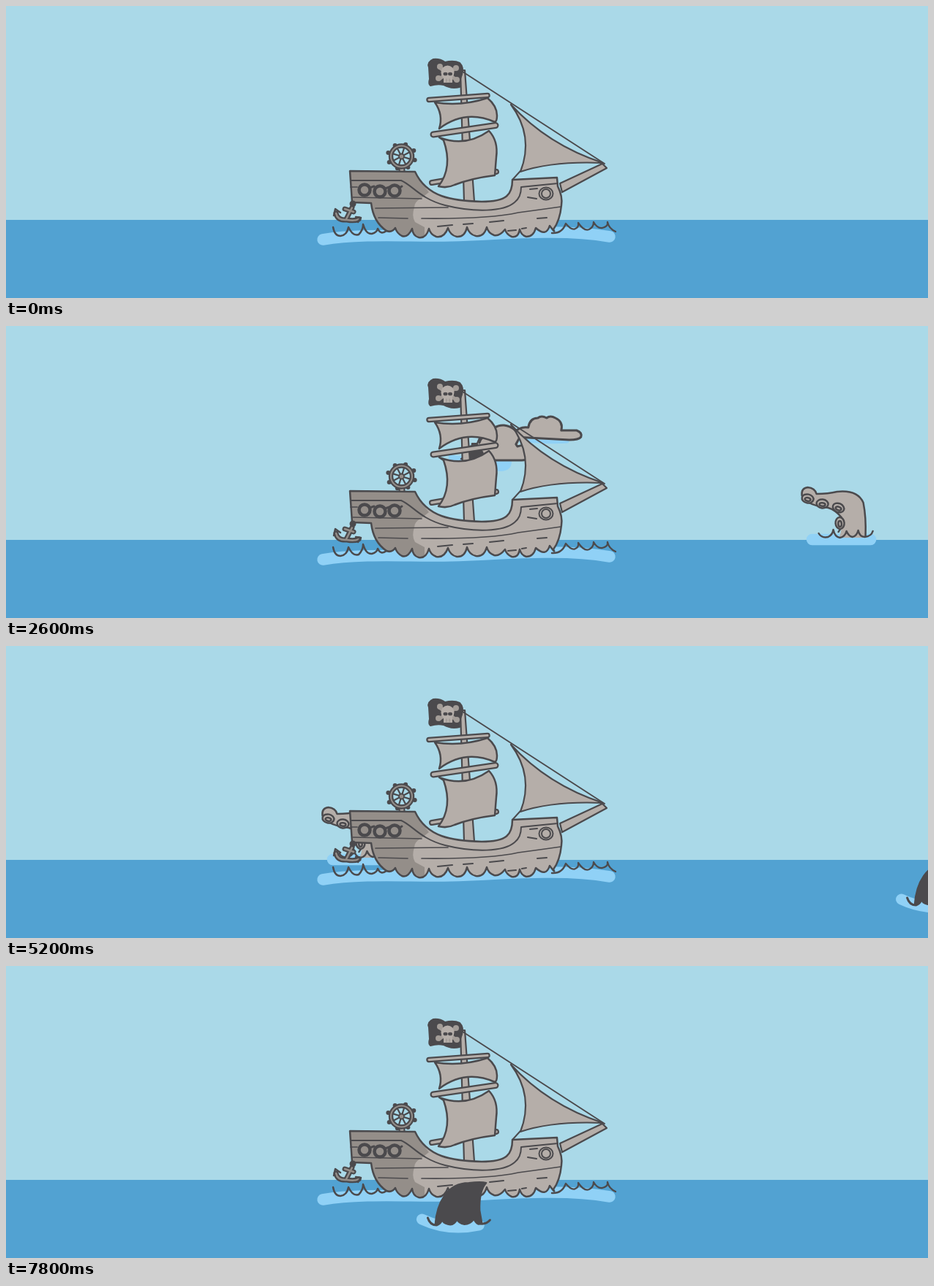
Recreate the animation shown at these times as an HTML page with a canvas. Size 1260 by 400 pixels, loop 8 s.

```html
<!DOCTYPE html>
<html lang="en">
<head>
<meta charset="utf-8">
<title>Ship at sea</title>
<style>
  html, body { margin: 0; width: 100%; height: 100%; overflow: hidden; background: #aad9e8; }
  canvas { display: block; width: 1260px; height: 400px; }
</style>
</head>
<body>
<canvas id="stage" width="1260" height="400"></canvas>
<script>
const ctx = document.getElementById('stage').getContext('2d');
const SKY = '#aad9e8', SEA = '#52a2d2', FOAM = '#90d1f6';
const INK = '#4b4a4d', GREY = '#b5aea9', SHADE = '#948e89', BONE = '#a39d98';
const LOOP = 8000, STEP = 200, CROSSING = 5000, WIDTH = 1260;

ctx.lineJoin = ctx.lineCap = 'round';

function fill(d, color) {
  ctx.fillStyle = color;
  ctx.fill(new Path2D(d));
}
function line(d, width = 2.5, color = INK) {
  ctx.lineWidth = width;
  ctx.strokeStyle = color;
  ctx.stroke(new Path2D(d));
}
function shape(d, color = GREY, width = 2.5) {
  fill(d, color);
  line(d, width);
}
function oval(x, y, rx, ry, color, width = 0, tilt = 0) {
  ctx.beginPath();
  ctx.ellipse(x, y, rx, ry, tilt, 0, Math.PI * 2);
  if (color) { ctx.fillStyle = color; ctx.fill(); }
  if (width) { ctx.lineWidth = width; ctx.strokeStyle = INK; ctx.stroke(); }
}
function spar(d, width) {
  line(d, width);
  line(d, width - 4.4, GREY);
}

function cloud() {
  fill('M0 176Q40 182 86 182Q88 198 72 199Q40 197 0 190Z', FOAM);
  line('M97 156Q135 160 162 158', 5, FOAM);
  shape('M89 146Q98 137 109 139Q111 126 122 126Q127 122 134 126Q139 122 146 126Q157 131 154 143L175 143Q183 146 181 152Q178 156 165 156L90 152Z', GREY, 3);
  shape('M17 182L24 177L21 173L28 171L25 166L32 164L32 161L39 161L42 154L54 160L55 184L34 183L30 186L26 182Z', INK, 2);
  fill('M42 184Q54 177 43 167Q36 160 46 155Q50 147 58 149Q61 135 76 136Q95 139 97 156Q95 160 94 165Q110 160 113 172Q112 184 100 184Z', GREY);
  line('M42 160Q45 149 58 149Q61 135 76 136Q92 138 97 153L92 162L94 165Q110 160 113 172Q112 184 100 184L42 184', 3);
}

function tentacle() {
  line('M18 292.5H98', 15.5, FOAM);
  fill('M4 232Q3 222 12 221Q22 222 24 230Q40 230 52 227Q80 224 88 242Q92 262 91 290L55 290Q60 277 58 262Q50 252 40 249Q22 247 14 242Q6 240 4 232Z', GREY);
  line('M54 282Q60 275 58 262Q50 252 40 249Q22 247 14 242Q6 240 4 232Q3 222 12 221Q22 222 24 230Q40 230 52 227Q80 224 88 242Q92 262 91 288');
  for (const [x, y, tilt] of [[12, 236.5, .2], [32, 243.5, .1], [54, 249, .4], [56, 270, 1.5]]) {
    oval(x, y, 8, 6, GREY, 2.5, tilt);
    oval(x, y + 1, 4, 2.3, GREY, 2.5, tilt);
  }
  line('M27 284Q31 291 40 289Q46 286 47 279Q49 289 56 290Q63 289 65 281Q68 288 73 289Q79 288 81 280Q83 289 90 289Q99 288 101 281');
}

function shark() {
  line('M14 347Q50 364 92 355', 15, FOAM);
  shape('M32 355C34 325 48 297 78 297Q95 295 102 297Q92 308 93 335L96 352Q90 357 85 347Q80 354 72 354Q64 353 62 347Q58 356 50 354Q42 352 42 348Q38 356 32 355Z', INK, 2);
  line('M22 345Q25 355 34 355M107 348Q102 354 94 353', 3);
}

function flag() {
  shape('M578 84Q575 77 584 73Q593 72 600 77Q612 74 620 78Q626 84 623 94Q619 104 620 111Q608 114 598 108Q590 106 580 109Q577 107 579 100Z', INK, 2);
  line('M592 84L615 101M615 85L592 100', 5, BONE);
  for (const [x, y] of [[593, 83], [615, 85], [591, 99], [616, 101]]) oval(x, y, 4, 4, BONE);
  oval(603.5, 91, 9, 9.5, GREY);
  fill('M598 97H610V105H598Z', GREY);
  oval(600.5, 93, 3, 2.3, INK);
  oval(607, 93, 3, 2.3, INK);
  line('M602 100V104M606 100V104', 1, SHADE);
}

function rigging() {
  shape('M621 88L627 88L640 268L626 268Z', GREY, 2.2);
  spar('M582 242L670 227', 8);
  shape('M592 180Q628 194 660 171Q673 185 670 207L668 232Q636 236 613 245Q603 250 591 247Q611 221 598 184Z');
  shape('M586 132Q622 138 658 126Q671 137 671 150Q671 158 668 159Q628 141 592 168Q598 149 586 132Z');
  spar('M578 128.5L658 122.5', 7.5);
  spar('M584 176L669 163.5', 9);
  line('M624 90L818 216M703 226L692 238', 2);
  shape('M690 135Q740 190 816 215Q748 212 703 227Q722 178 690 135Z', GREY, 2.2);
  flag();
}

function wheel() {
  const [x, y] = [540.5, 206];
  spar('M541 222V227', 9);
  for (let i = 0; i < 8; i++) {
    const a = i * Math.PI / 4 + .3, c = Math.cos(a), s = Math.sin(a);
    oval(x + c * 19, y + s * 17, 3, 3, INK);
    line(`M${x} ${y}L${x + c * 13} ${y + s * 13}`, 2.2);
  }
  oval(x, y, 14.5, 14.5, null, 6.5);
  ctx.lineWidth = 2;
  ctx.strokeStyle = SHADE;
  ctx.stroke();
  oval(x, y, 3.5, 3.5, SHADE, 1.8);
}

function anchor() {
  const d = 'M473 276L465 292M463 278L475 282M451 284Q453 294 466 293Q476 295 482 292';
  line(d, 7);
  line(d, 2.5, SHADE);
  oval(474, 271, 3.5, 3.5, INK, 2);
  line('M448 287L450 278L457 283M478 289L485 290L481 296', 2.5);
}

const SCALLOPS = 'Q752 313 743 301Q738 317 724 304Q721 316 711 316Q704 314 702 306Q700 318 691 316Q684 313 682 306Q674 316 667 314Q659 311 657 303Q653 317 642 315Q633 313 630 303Q627 317 616 316Q607 314 604 304Q599 318 588 316Q580 313 578 305Q574 319 564 317Q556 315 555 305Q549 318 541 315Q534 311 532 304Q527 311 520 308';
const HULL = 'M470 226L559 227C575 262 610 267 650 268C685 268 692 258 692 238L753 235L754 247Q761 261 759 273Q757 294 748 306' + SCALLOPS + 'Q502 296 499 270L473 269Z';

function hull() {
  shape('M757 243L815 216L821 222L760 255Z', GREY, 2.2);
  ctx.save();
  ctx.clip(new Path2D(HULL));
  ctx.fillStyle = GREY;
  ctx.fillRect(460, 220, 310, 100);
  fill('M465 220H559L566 240L578 255L568 263Q558 268 558 276Q554 288 559 296L572 303V320H465Z', SHADE);
  ctx.restore();
  line(HULL);
  line('M471 239L540 239C556 246 566 264 600 273C640 283 680 282 695 269Q704 262 704 248L754 243', 2);
  line('M471 248L480 248M474 262L568 264M505 277L604 276M509 290L549 291M568 291Q660 292 700 283Q730 279 758 275', 1.7);
  line('M590 302L610 300M625 299L638 298M686 308L697 307M705 305L711 304M716 251L726 250M713 262L725 264M726 291L739 290M661 296L680 294', 2);
  for (const [x, y] of [[490, 252], [511, 254], [531, 253]]) oval(x, y, 7.5, 7.5, SHADE, 4.5);
  line('M497 249L503 247M518 250L524 248M538 249L541 247', 3);
  oval(738, 257, 9.5, 8.5, GREY, 2);
  oval(738, 257, 6, 6, GREY, 2);
}

function ship() {
  line('M433 320C480 312 540 315 580 315C650 315 690 309 745 310Q790 310 825 316', 15.5, FOAM);
  rigging();
  wheel();
  hull();
  anchor();
  line('M447 303Q449 315 457 315Q466 314 468 303Q474 316 482 313Q488 307 488 299Q492 313 500 312Q507 310 508 305Q512 314 520 308');
  line('M746 311Q760 312 765 298Q773 308 778 305Q783 303 782 297Q790 309 797 306Q803 303 803 296Q808 305 815 304Q823 302 822 296Q824 305 833 309', 2.3);
}

function cross(draw, age) {
  if (age < 0 || age >= CROSSING) return;
  ctx.save();
  ctx.translate(WIDTH * (1 - age / CROSSING), 0);
  draw();
  ctx.restore();
}

function render() {
  const now = performance.now() % LOOP;
  const t = Math.floor(now / STEP) * STEP;
  ctx.fillStyle = SKY;
  ctx.fillRect(0, 0, WIDTH, 293);
  ctx.fillStyle = SEA;
  ctx.fillRect(0, 293, WIDTH, 107);
  cross(cloud, t);
  cross(tentacle, t - 1900);
  ship();
  cross(shark, t - 5000);
  requestAnimationFrame(render);
}
render();
</script>
</body>
</html>
```
